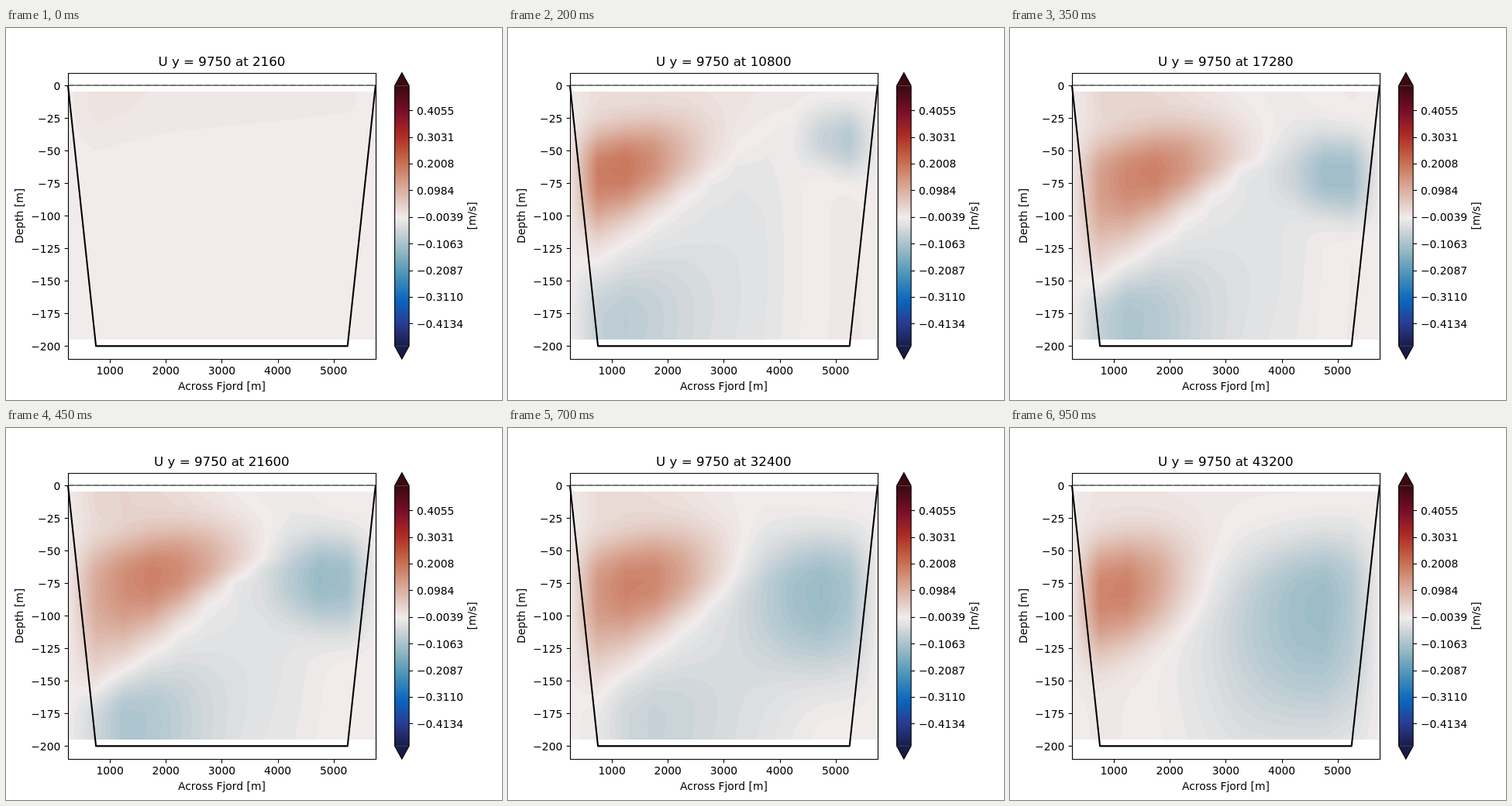
These frames come from a looping animation (640x480 px, 1000 ms). An HTML page with a canvas:

```html
<!DOCTYPE html>
<html lang="en">
<head>
<meta charset="utf-8">
<title>Across-fjord velocity</title>
<style>
html, body { margin: 0; width: 100%; height: 100%; overflow: hidden; background: #fff; }
canvas, svg { position: absolute; left: 0; top: 0; }
text { font: 13.89px "DejaVu Sans", sans-serif; fill: #000; }
#title { font-size: 16.67px; }
</style>
</head>
<body>
<canvas id="field" width="640" height="480"></canvas>
<svg id="axes" width="640" height="480" viewBox="0 0 640 480"></svg>
<script>
const STEP_MS = 50, STEPS = 20, BANDS = 127;
const LEFT = 80, RIGHT = 476.8;
const COLS = 12, ROWS = 20;
const px = m => LEFT + (m - 250) * (RIGHT - LEFT) / 5500;
const py = depth => 74.4 + depth * 1.68;
const barY = v => 242.4 - v * 336;
const snap = v => Math.floor(v + .5) + .5;
const mix = (a, b, u) => a + (b - a) * u;
const clamp = (v, lo, hi) => Math.max(lo, Math.min(hi, v));

// Diverging scale: evenly spaced colours on each side of a pale centre
const COLD = ["#171c42", "#293a8f", "#0b66bd", "#4590b9", "#8eb5c2", "#d2d8db"];
const WARM = ["#e6d2cc", "#d59d89", "#c46548", "#ac2b24", "#780e28", "#3c0911"];
const PALE = "#f1eceb";
const rgb = hex => [1, 3, 5].map(i => parseInt(hex.slice(i, i + 2), 16));
function shade(u) {
  const side = (u < .5 ? COLD : [...WARM].reverse()).map(rgb);
  const p = Math.min(u, 1 - u) * 11, i = Math.floor(p);
  const next = side[i + 1] || rgb(PALE);
  const w = i < 5 ? p - i : (p - 5) * 2;
  return side[i].map((c, k) => Math.round(mix(c, next[k], w)));
}
const BAND = Array.from({ length: BANDS }, (_, k) => shade((k + .5) / BANDS));

// The currents as lopsided bells; x in km, depth in m
function currents(step) {
  const u = step / (STEPS - 1);
  const swell = Math.sin(Math.PI * u) ** 2;
  const rise = 1 - Math.exp(-step * step);
  const s = Math.min(1, step / 6), grow = s * s * (3 - 2 * s);
  const burst = Math.exp(-(((step - 2) / 2) ** 2));
  return {
    ambient: .007 * rise,
    bells: [
      { // inflow
        amp: mix(.009, .18 + .045 * burst, rise),
        x: .75 + .9 * swell + .35 * u, z: mix(5, 59 + 21 * u, rise),
        left: 1.5, right: 1.1 + .4 * swell,
        up: 29 + 10 * u, down: 36 + 8 * u, downSlope: -8 - 12 * swell, tilt: -8
      },
      { // deep return flow
        amp: -.105 * Math.sin(Math.PI * u ** .8),
        x: .8 + u, z: 180, left: .7, right: 1.6,
        up: 48 - 14 * swell, upSlope: 20, down: 100
      },
      { // outflow along the right wall
        amp: -.125 * grow,
        x: 5.2 - .5 * u, z: 8 + 50 * grow * grow + 30 * u,
        left: .35 + 1.1 * u, right: 1,
        up: 20 + 30 * u, down: 20 + 80 * u * u, downSlope: 8, tilt: 6 - 12 * u
      },
      { // weak flow in the middle
        amp: -.026 * rise,
        x: 3.2 + .8 * swell, z: mix(135, 60, swell), left: 1.4, right: .9,
        up: 90, down: 200
      },
      { // surface layer
        amp: .0075 + .03 * swell,
        x: .75 + .4 * swell, z: 5, left: 1, right: mix(9, 1.6, grow),
        up: 30, down: mix(42, 28, grow), downSlope: mix(-4, 0, grow)
      }
    ]
  };
}
function bell({ amp, x, z, left, right, up, down, upSlope = 0, downSlope = 0, tilt = 0 }, km, depth) {
  const dx = km - x, dz = depth - z - tilt * dx;
  const h = Math.max(8, dz < 0 ? up + upSlope * dx : down + downSlope * dx);
  return amp * Math.exp(-((dx / (dx < 0 ? left : right)) ** 2) - Math.abs(dz / h) ** 2.5);
}

const ctx = document.getElementById("field").getContext("2d");
const AREA = { x: 80, y: 82, w: 397, h: 320 };
const img = ctx.createImageData(AREA.w, AREA.h);

function drawField(step) {
  const { ambient, bells } = currents(step);
  const node = (i, j) => {
    const wall = i === 0 || i === COLS - 1 ? .06 : 1;
    return wall * bells.reduce((sum, b) => sum + bell(b, .25 + .5 * i, 5 + 10 * j), ambient);
  };
  const grid = Array.from({ length: ROWS }, (_, j) =>
    Array.from({ length: COLS }, (_, i) => node(i, j)));
  let o = 0;
  for (let y = 0; y < AREA.h; y++) {
    const gy = Math.max(0, (AREA.y + y + .5 - py(5)) / 16.8);
    const j = Math.min(ROWS - 2, Math.floor(gy));
    const line = grid[j].map((a, i) => mix(a, grid[j + 1][i], gy - j));
    for (let x = 0; x < AREA.w; x++) {
      const gx = (x + .5) / (RIGHT - LEFT) * (COLS - 1);
      const i = Math.min(COLS - 2, Math.floor(gx));
      const k = Math.floor((mix(line[i], line[i + 1], gx - i) + .5) * BANDS);
      img.data.set(BAND[clamp(k, 0, BANDS - 1)], o);
      img.data[o + 3] = 255;
      o += 4;
    }
  }
  ctx.putImageData(img, AREA.x, AREA.y);
}

const svg = document.getElementById("axes");
function add(tag, attrs, text) {
  const el = document.createElementNS("http://www.w3.org/2000/svg", tag);
  for (const k in attrs) el.setAttribute(k, attrs[k]);
  if (text !== undefined) el.textContent = text;
  return svg.appendChild(el);
}
const path = (d, width, more) =>
  add("path", { d, fill: "none", stroke: "#000", "stroke-width": width, ...more });
const label = (x, y, s, anchor = "middle", more) =>
  add("text", { x, y, "text-anchor": anchor, ...more }, s);
const signed = s => String(s).replace("-", "\u2212");
const upright = (x, s) => label(0, 0, s, "middle", { transform: `translate(${x} 242.4) rotate(-90)` });
const besideTick = y => Math.round(y + 5.5);

function drawAxes() {
  const sea = `M80 74H${RIGHT}`;
  path(sea, 2, { stroke: "#8a8e8a" });
  path(sea, 2, { stroke: "#727a74", "stroke-dasharray": "7.7 3.3" });
  path(`M80 74.4L${px(750)} 410.4H${px(5250)}L${RIGHT} 74.4`, 2.08, { "stroke-linejoin": "round" });
  path("M80.5 58.5H477.5V427.5H80.5Z", 1.11);
  for (let m = 1000; m <= 5000; m += 1000) {
    path(`M${snap(px(m))} 427.5v4.9`, 1.11);
    label(px(m), 447, m);
  }
  for (let d = 0; d <= 200; d += 25) {
    path(`M80.5 ${snap(py(d))}h-4.9`, 1.11);
    label(70.3, besideTick(py(d)), signed(d ? -d : 0), "end");
  }
  label(278.4, 466.5, "Across Fjord [m]");
  upright(22, "Depth [m]");

  // Colour bar with pointed ends
  const L = 501.6, R = 520.1, mid = (L + R) / 2;
  add("path", { d: `M${L} 74.6L${mid} 57.6L${R} 74.6Z`, fill: WARM[5] });
  add("path", { d: `M${L} 410.2L${mid} 427.2L${R} 410.2Z`, fill: COLD[0] });
  BAND.forEach((c, k) => {
    const y = barY((k + 1) / BANDS - .5);
    add("rect", { x: L, y, width: R - L, height: Math.min(5, 410.4 - y), fill: `rgb(${c})` });
  });
  path(`M${L} 74.4L${mid} 57.6L${R} 74.4V410.4L${mid} 427.2L${L} 410.4Z`, 1.11);
  for (let k = 11; k <= 115; k += 13) {
    const v = k / BANDS - .5;
    path(`M${R} ${snap(barY(v))}h4.9`, 1.11);
    label(529.9, besideTick(barY(v)), signed(v.toFixed(4)), "start");
  }
  upright(606, "[m/s]");
}

drawAxes();
const title = label(278.4, 49.3, "", "middle", { id: "title" });
let shown = -1;
function tick(now) {
  const step = Math.floor(now / STEP_MS) % STEPS;
  if (step !== shown) {
    shown = step;
    drawField(step);
    title.textContent = `U y = 9750 at ${2160 * (step + 1)}`;
  }
  requestAnimationFrame(tick);
}
tick(performance.now());
</script>
</body>
</html>
```
